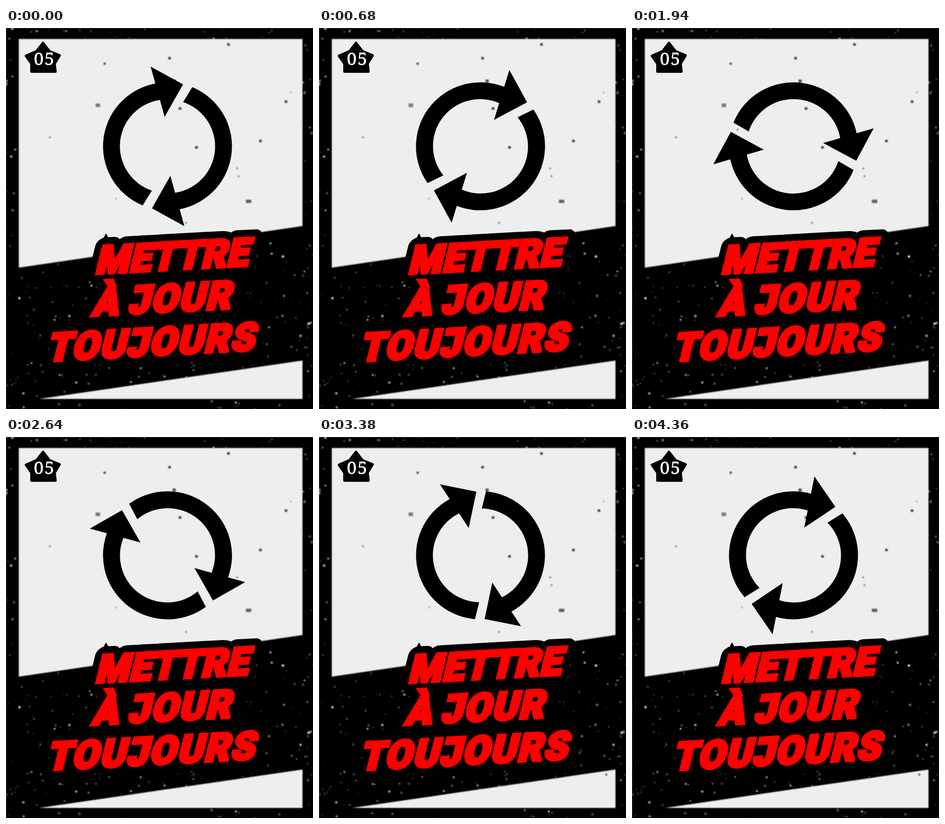
These frames come from a looping animation (672x833 px, 4.38 s). An HTML page:

```html
<!DOCTYPE html>
<html lang="fr">
<head>
<meta charset="utf-8">
<title>Mettre à jour toujours</title>
<style>
  html, body { margin: 0; width: 100%; height: 100%; overflow: hidden; background: #000; }
  svg { display: block; width: 100vw; height: 100vh; }
  .title { font: 900 84px Roboto, Inter, sans-serif; word-spacing: -5px; }
  .halo { fill: #000; stroke: #000; stroke-width: 37; stroke-linejoin: round; }
  .face { fill: #f00; stroke: #f00; stroke-width: 7; stroke-linejoin: miter; }
  .number { font: 38px "Noto Serif", "Liberation Serif", serif; letter-spacing: 2px; fill: #fff; stroke: #fff; stroke-width: .6; }
</style>
</head>
<body>
<svg viewBox="0 0 672 833" preserveAspectRatio="none">
  <defs>
    <filter id="soft" x="-5%" y="-5%" width="110%" height="110%"><feGaussianBlur stdDeviation=".9"/></filter>
    <g id="arrow">
      <path d="M-21 139A140.6 140.6 0 0 1 -48 -132L-35 -97A102.8 102.8 0 0 0 -9.5 102.4Z"/>
      <path d="M0 -140L-78 -161L-21.7 -61.3Z"/>
    </g>
    <path id="jBar" d="M4 -59.7H28V-48H4Z"/>
    <g id="lines">
      <g transform="translate(194 537.5) rotate(-3.1) skewX(-17)">
        <text letter-spacing="1">METTRE</text>
      </g>
      <g transform="translate(187 629.5) rotate(-3.1) skewX(-17)">
        <text letter-spacing="3">À JOUR</text>
        <use href="#jBar" x="80"/>
      </g>
      <g transform="translate(88 728.5) rotate(-3.1) skewX(-17)">
        <text letter-spacing="3">TOUJOURS</text>
        <use href="#jBar" x="175"/>
      </g>
    </g>
  </defs>

  <rect width="672" height="833"/>
  <path d="M.5 833V.5H672" fill="none" stroke="#3a3a38"/>
  <g id="stars" filter="url(#soft)"></g>
  <g fill="#eee" filter="url(#soft)">
    <path d="M28 24H649V433L28 524Z"/>
    <path d="M72 811L649 727V811Z"/>
  </g>
  <g id="grains" fill="#222" filter="url(#soft)"></g>
  <g id="lateGrains" filter="url(#soft)">
    <circle cx="629" cy="738" r="2.2" fill="#444"/>
    <circle cx="572" cy="686" r="4" fill="#222"/>
  </g>

  <path d="M81 33L95 51L117 60L106 78L108 95H56V78L44 61L67 51Z" stroke="#000" stroke-width="6" stroke-linejoin="round"/>
  <text class="number" x="61" y="81">05</text>

  <g transform="translate(353.5 258.7) scale(1.006 .997)">
    <g id="wheel">
      <use href="#arrow"/>
      <use href="#arrow" transform="rotate(180)"/>
    </g>
  </g>

  <path d="M214 458L219 449L224 458Z"/>
  <g class="title">
    <use href="#lines" class="halo"/>
    <use href="#lines" class="face"/>
  </g>
</svg>
<script>
const LOOP = 4380;
const byId = id => document.getElementById(id);

function addSpeck(parent, x, y, w, h, attrs) {
  const el = document.createElementNS("http://www.w3.org/2000/svg", "rect");
  const all = { x: x - w / 2, y: y - h / 2, width: w, height: h, rx: 1, ...attrs };
  for (const key in all) el.setAttribute(key, all[key]);
  parent.append(el);
}

let seed = 5;
const random = () => (seed = seed * 16807 % 2147483647) / 2147483647;
const tints = ["#fff", "#ccc", "#aab", "#bba"];

for (let i = 0; i < 700; i++) {
  const size = 2 + 3.5 * random() ** 2;
  addSpeck(byId("stars"), random() * 672, random() * 833, size, size,
    { fill: tints[i % 4], opacity: .25 + .65 * random() });
}

// x, y, size
[[487, 36, 6], [358, 66, 6], [216, 78, 5], [381, 176, 6], [613, 161, 6], [623, 141, 3],
 [96, 239, 4], [557, 247, 6], [417, 261, 6], [506, 307, 4], [509, 324, 4], [368, 116, 7],
 [241, 373, 3], [394, 426, 4], [231, 222, 4]]
  .forEach(([x, y, s]) => addSpeck(byId("grains"), x, y, s, s * .9, { opacity: s > 4 ? .8 : .55 }));
addSpeck(byId("grains"), 201, 169, 10, 8, { opacity: .55 });
addSpeck(byId("grains"), 531, 379, 12, 7, { opacity: .7 });

// time in ms, wheel angle in degrees
const turns = [[0, 14], [680, 46.4], [1420, 79], [1940, 103.1], [2640, 135], [3380, 176.3], [4360, 220.6]];

function angleAt(t) {
  const i = Math.max(1, turns.findIndex(([time]) => time >= t));
  const [t0, a0] = turns[i - 1], [t1, a1] = turns[i];
  return a0 + (a1 - a0) * (t - t0) / (t1 - t0);
}

// Poses are held for 20, 20 and 100 ms in turn.
function heldTime(t) {
  const phase = (t + 20) % 140;
  return t - phase + (phase < 20 ? 0 : phase < 40 ? 20 : 40);
}

function draw(now) {
  const t = heldTime(now % LOOP);
  byId("wheel").setAttribute("transform", `rotate(${angleAt(t)})`);
  byId("lateGrains").setAttribute("visibility", t >= 3010 ? "visible" : "hidden");
}

const start = performance.now();
function tick() {
  draw(performance.now() - start);
  requestAnimationFrame(tick);
}
tick();
</script>
</body>
</html>
```
